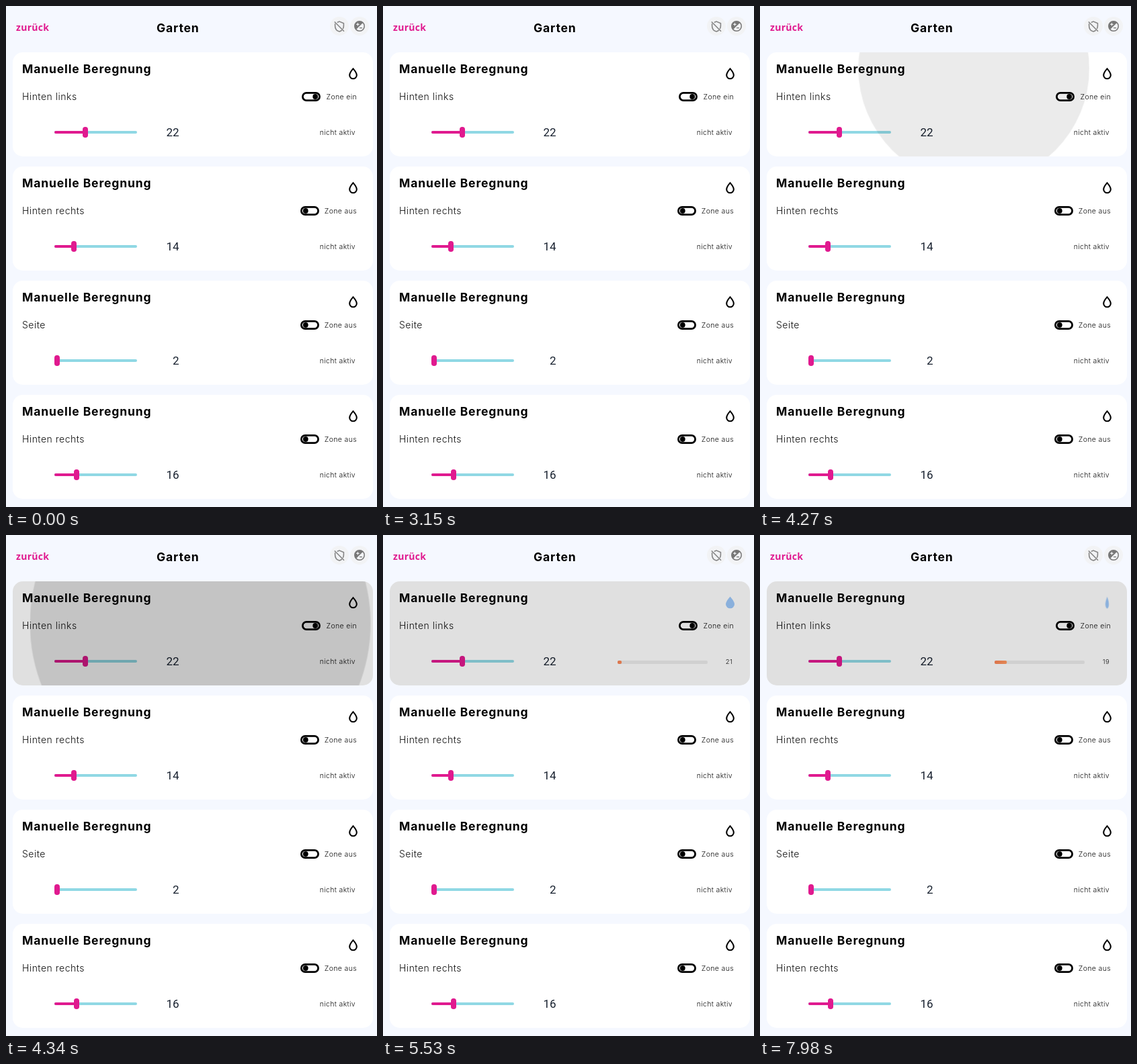
An HTML page that plays this animation: 552 by 746 pixels, repeating every 8 s.

```html
<!DOCTYPE html>
<html lang="de">
<head>
<meta charset="utf-8">
<title>Garten</title>
<style>
  html, body { margin: 0; width: 100%; height: 100%; overflow: hidden; background: #f5f8ff; }
  svg { display: block; width: 552px; height: 746px; font-family: Inter, sans-serif; }
  .title { font-size: 17.5px; font-weight: 700; letter-spacing: .88px; }
  .back { font: 700 14px "Open Sans", sans-serif; letter-spacing: .3px; fill: #e01a8f; }
  .zone { font-size: 14px; font-weight: 300; letter-spacing: .5px; fill: #111; }
  .small { font-size: 10.5px; font-weight: 300; letter-spacing: .35px; text-anchor: end; fill: #111; }
  .value { font: 17px Roboto, sans-serif; text-anchor: end; fill: #17202e; }
  .count { font-size: 9.5px; }
  .pink { fill: #e01a8f; }

  /* The script scrubs these on a shared clock. */
  .idle { animation: hide 1ms 5500ms both paused; }
  .active { animation: show 1ms 5500ms both paused; }
  .focus { animation: show 1ms 4300ms both paused; }
  .move { animation: move 225ms 4232ms cubic-bezier(.4, 0, .2, 1) both paused; }
  .fade {
    animation: show 75ms 4220ms linear both paused, hide 160ms 4490ms linear forwards paused;
  }
  @keyframes show { from { opacity: 0 } to { opacity: 1 } }
  @keyframes hide { from { opacity: 1 } to { opacity: 0 } }
  @keyframes move {
    from { transform: translate(322px, 88px) scale(1) }
    to { transform: translate(278px, 146.5px) scale(1.767) }
  }
</style>
</head>
<body>
<svg viewBox="0 0 552 746">
  <defs>
    <clipPath id="card"><rect x="10" y="69" width="536" height="155" rx="15"/></clipPath>
    <linearGradient id="warm" gradientUnits="userSpaceOnUse" x1="349" x2="373">
      <stop stop-color="#dc744b"/><stop offset="1" stop-color="#e48e58"/>
    </linearGradient>
  </defs>

  <text class="back" x="15" y="37">zurück</text>
  <text class="title" x="224" y="39">Garten</text>
  <g fill="#f2f3f5"><circle cx="496" cy="30" r="14"/><circle cx="526" cy="30" r="14"/></g>
  <path fill="none" stroke="#858585" stroke-width="1.6"
    d="M488.8 23.5L503 37.7M492.8 24.4L496 23L502.4 25.8V29.5Q502.4 32 501.2 34.1M489.6 26.3V29.5C489.6 33.8 492.3 37 496 38C497.4 37.6 498.7 36.9 499.7 35.9"/>
  <path fill="#777" fill-rule="evenodd" transform="translate(516.4 20.4) scale(.8)"
    d="M12 2a10 10 0 1 0 0 20a10 10 0 1 0 0-20ZM12 20a8 8 0 0 1-5.66-2.34L17.66 6.34A8 8 0 0 1 12 20ZM6 8H8V6H9.5V8H11.5V9.5H9.5V11.5H8V9.5H6ZM12 16H17V14.5H12Z"/>

  <g id="rows"></g>

  <g clip-path="url(#card)">
    <rect class="focus" x="10" y="69" width="536" height="155" fill="#000" fill-opacity=".12"/>
    <g class="fade"><circle class="move" r="161" fill="#000" fill-opacity=".12"/></g>
  </g>

  <g class="active">
    <path id="drop" fill="#8ab0dc" d="M0 -8.6C0 -8.6 6.5 -1.6 6.5 2.5A6.5 6.4 0 0 1 -6.5 2.5C-6.5 -1.6 0 -8.6 0 -8.6Z"/>
    <rect x="349" y="187" width="134" height="5" rx="2" fill="#d0d0d0"/>
    <rect id="bar" x="349" y="187" height="5" rx="2" fill="url(#warm)"/>
    <text id="count" class="small count" x="520" y="192"></text>
  </g>
</svg>
<script>
  const LOOP = 8000, STEP = 70, START = 5530, SPIN = 3000, MINUTES = 22;
  const get = id => document.getElementById(id);

  const zones = [
    { name: 'Hinten links', value: 22, thumb: 118, on: true },
    { name: 'Hinten rechts', value: 14, thumb: 101 },
    { name: 'Seite', value: 2, thumb: 76 },
    { name: 'Hinten rechts', value: 16, thumb: 105 }
  ];

  const toggle = on => {
    const x = on ? 440 : 438;
    return `<rect x="${x + 1.4}" y="60.4" width="25.2" height="11.2" rx="5.6" fill="none" stroke="#000" stroke-width="2.8"/>
      <circle cx="${x + (on ? 20.2 : 7.8)}" cy="66" r="3.9"/>`;
  };

  const slider = thumb => `
    <rect x="72" y="117" width="123" height="4" rx="2" fill="#90d8e4"/>
    <rect class="pink" x="72" y="117" width="${thumb - 72}" height="4" rx="2"/>
    <rect class="pink" x="${thumb - 4}" y="111" width="8" height="16" rx="3.8"/>`;

  const outline = `<path fill="none" stroke="#000" stroke-width="2.1"
    d="M516.5 24.4C514 27.2 511.2 31.3 511.2 34A5.3 5.3 0 0 0 521.8 34C521.8 31.3 519 27.2 516.5 24.4Z"/>`;

  const row = ({ name, value, thumb, on }, i) => `
    <g transform="translate(0 ${69 + 170 * i})">
      <rect x="10" width="536" height="155" rx="15" fill="#fff"/>
      <text class="title" x="24" y="31">Manuelle Beregnung</text>
      <text class="zone" x="24" y="71">${name}</text>
      ${toggle(on)}
      <text class="small" x="522" y="70">Zone ${on ? 'ein' : 'aus'}</text>
      ${slider(thumb)}
      <text class="value" x="257.5" y="125">${value}</text>
      <g class="${on ? 'idle' : ''}">
        ${outline}
        <text class="small" x="520" y="123">nicht aktiv</text>
      </g>
    </g>`;

  get('rows').innerHTML = zones.map(row).join('');
  const animations = document.getAnimations();

  function draw(now) {
    const t = Math.floor(now % LOOP / STEP) * STEP;
    for (const a of animations) a.currentTime = t;

    const run = Math.max(0, t - START);
    const left = MINUTES - 1 - Math.floor(run / 1000);
    const turn = Math.cos(2 * Math.PI * run / SPIN);
    get('drop').setAttribute('transform', `translate(516.5 100.4) scale(${turn.toFixed(4)} 1)`);
    get('bar').setAttribute('width', 134 * (MINUTES - left) / MINUTES);
    get('count').textContent = left;
  }

  const origin = performance.now();
  function tick() {
    draw(performance.now() - origin);
    requestAnimationFrame(tick);
  }
  tick();
</script>
</body>
</html>
```
